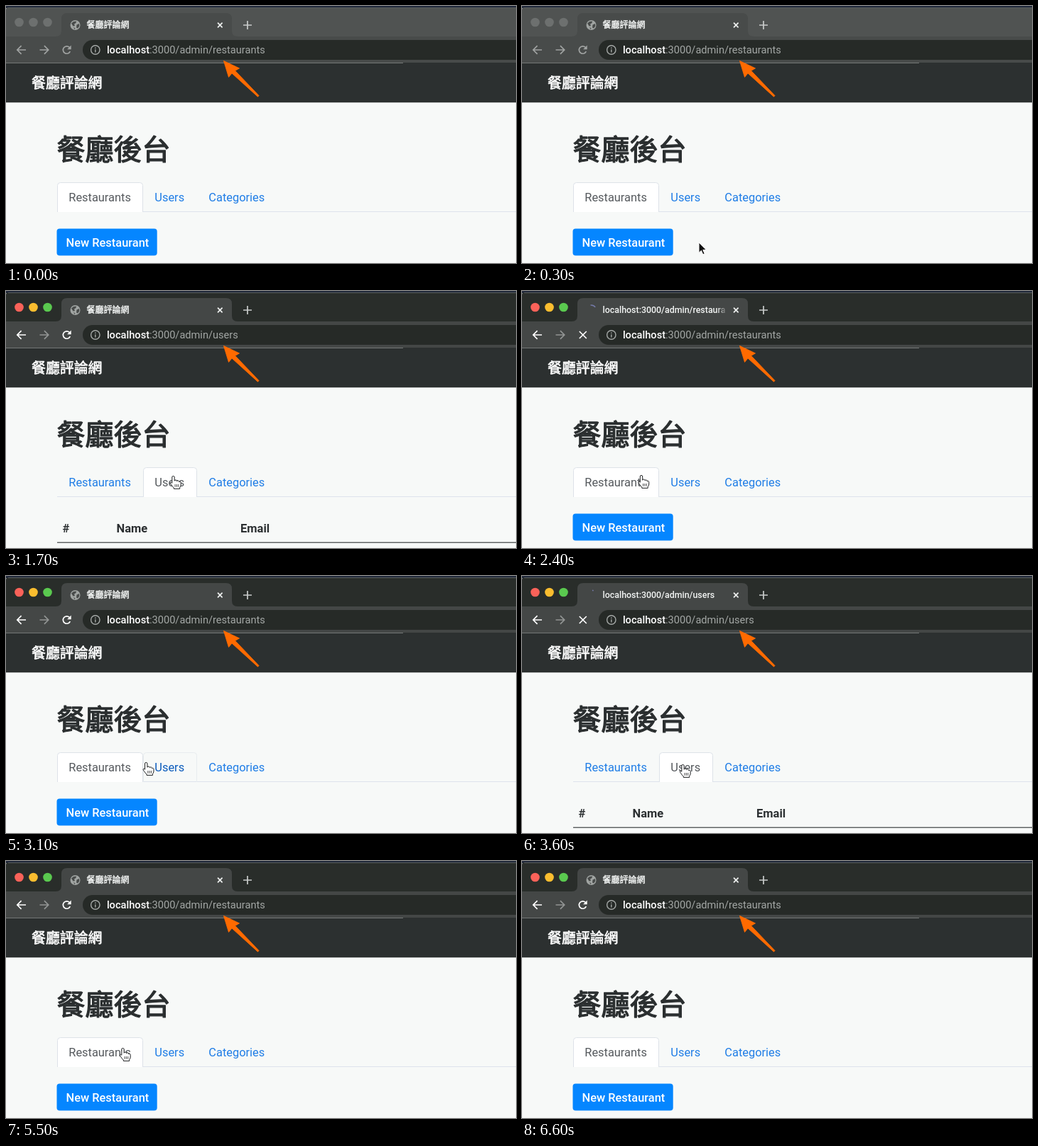
Animation, 718 px wide and 363 px high, one loop 6700 ms. Source, as an HTML page:

```html
<!DOCTYPE html>
<html lang="zh-Hant">
<head>
<meta charset="utf-8">
<title>餐廳評論網</title>
<style>
  html, body { margin: 0; width: 100%; height: 100%; overflow: hidden; background: #f7f9f8; }
  svg { display: block; width: 718px; height: 363px; }
  text { font-family: Roboto, "Noto Sans CJK TC", "Noto Sans CJK", sans-serif; white-space: pre; }
  .cjk { font-family: "Noto Sans CJK TC", "Noto Sans CJK", sans-serif; font-weight: 500; stroke-linejoin: round; }
  .link { font-size: 16.4px; }
  .th { font-size: 16.5px; font-weight: 700; fill: #2b2f31; }
  .icon { fill: none; stroke-width: 1.7; }
</style>
</head>
<body>
<svg viewBox="0 0 718 363">
  <defs>
    <linearGradient id="fade" gradientUnits="userSpaceOnUse" x1="274" x2="290" y1="0" y2="0">
      <stop stop-color="#f2f4f3"/><stop offset="1" stop-color="#f2f4f3" stop-opacity="0"/>
    </linearGradient>
  </defs>

  <!-- browser window -->
  <rect width="718" height="3" fill="#20283a"/>
  <path id="strip" d="M0 5Q0 2 4 2H718V43H0Z"/>
  <rect x="3" y="2" width="715" height="1" fill="#5a5e5d"/>
  <path id="tab" d="M70 43Q78 43 78 35V18Q78 10 86 10H310Q318 10 318 18V35Q318 43 326 43Z"/>
  <rect id="bar" y="43" width="718" height="38"/>
  <rect x="108" y="48" width="640" height="28" rx="14" fill="#262a27"/>
  <g id="lights">
    <circle cx="18.5" cy="23" r="6.3"/><circle cx="38.5" cy="23" r="6.3"/><circle cx="58.5" cy="23" r="6.3"/>
  </g>
  <g id="globe">
    <circle cx="97.5" cy="27" r="7" fill="#a0a4a2"/>
    <path d="M92 24.5L95 22L99 21.5L98.5 24L96 25.5L97 28L94.5 28.5ZM99.5 26.5L103 25L103.3 28.5L101 31.5L99 30.5ZM95 30L97.5 31.5L96.5 33Z" fill="#484b4a"/>
  </g>
  <path id="spin" fill="none" stroke="#747aa8" stroke-width="1.5"/>
  <text id="title" x="113.6" y="31.4" fill="url(#fade)" stroke="url(#fade)" font-weight="500"></text>
  <path d="M298 23.7l6.6 6.6m0-6.6l-6.6 6.6" class="icon" stroke="#eef0ef"/>
  <path d="M334 27h12m-6-6v12" class="icon" stroke="#c9cccb"/>
  <path id="back" class="icon" d="M28 62H16M21.6 56.2L15.8 62L21.6 67.8"/>
  <path id="next" class="icon" d="M47.5 62H59.5M53.9 56.2L59.7 62L53.9 67.8"/>
  <path id="stop" class="icon" d="M80.8 57l10 10m0-10l-10 10" stroke="#fff"/>
  <g id="reload">
    <path class="icon" d="M90.3 64.2A5.2 5.2 0 1 1 89.2 58.3"/>
    <path d="M91.7 55.6V61.2H86.1Z" stroke="none"/>
  </g>
  <g fill="none" stroke="#a5a9a7" stroke-width="1.4">
    <circle cx="125.8" cy="62" r="6.2"/><path d="M125.8 61.2v4.2M125.8 58.4v1.5"/>
  </g>
  <text x="141.9" y="67" font-size="14.6" fill="#a3a7a5"><tspan fill="#fff" font-weight="500">localhost</tspan><tspan id="url"></tspan></text>

  <!-- page -->
  <rect y="80" width="718" height="57" fill="#2c3030"/>
  <rect y="80" width="559" height="1" fill="#747776"/>
  <text class="cjk" x="36" y="115.6" font-size="19.9" fill="#fff" stroke="#fff" stroke-width=".6">餐廳評論網</text>
  <rect y="136.3" width="718" height="227" fill="#f7f9f8"/>
  <text class="cjk" x="71.5" y="217" font-size="40" fill="#2b2f30" stroke="#2b2f30" stroke-width="1.3">餐廳後台</text>
  <rect x="72" y="290" width="646" height="1" fill="#dde2ec"/>
  <g id="tabs"></g>
  <g id="listPage">
    <rect id="button" x="71.5" y="314.6" width="141.2" height="38" rx="4"/>
    <text x="84.6" y="340" font-size="16.4" font-weight="500" fill="#fff">New Restaurant</text>
  </g>
  <g id="userPage">
    <text class="th" x="79.5" y="341">#</text>
    <text class="th" x="155.5" y="341">Name</text>
    <text class="th" x="330" y="341">Email</text>
    <rect x="72" y="354.6" width="646" height="1.3" fill="#4c5051"/>
  </g>
  <path d="M306.5 77.5L328.5 88L322.6 91.4L356 126.6L354.5 128.2L318 95L313.5 100.5Z" fill="#ff6a00" stroke="#ff6a00" stroke-width=".9" stroke-linejoin="round"/>

  <!-- pointers, hot spot at 0,0 -->
  <g id="hand" fill="#fff" stroke="#1d1f20" stroke-linejoin="round">
    <path d="M-1.7 1Q-1.7-.6 0-.6Q1.6-.6 1.7 1V6.2Q2.2 4.6 3.7 5Q4.9 5.3 5 6.6Q5.8 5.5 7 6Q8 6.4 8.1 7.6Q9 6.9 10 7.5Q10.7 8 10.7 9.2V12Q10.5 14.2 9.2 15.4V17.4H.8V16Q-1.5 14-3 11.4Q-4.8 9.4-3.9 8.5Q-2.9 7.7-1.7 9.2Z"/>
    <path d="M2.6 11v3.8M4.9 11v3.8M7.2 11v3.8" stroke-width=".8"/>
  </g>
  <path id="arrow" d="M0 0V14.5L3.4 11.4L5.8 17L8.2 16L5.8 10.6H10.4Z" fill="#111" stroke="#fff" stroke-width="1"/>
</svg>
<script>
const LOOP = 6700, STEP = 100;
const ACTIVE_AT = 400;

// page loads: request sent, page shown, finished
const LOADS = [
  { ask: 1100, show: 1200, done: 1500, page: 'users' },
  { ask: 2200, show: 2300, done: 2600, page: 'restaurants' },
  { ask: 3500, show: 3600, done: 3900, page: 'users' },
  { ask: 5100, show: 5200, done: 5500, page: 'restaurants' }
];

// pointer hot spot: time, x, y
const PATH = [
  [300, 249, 334], [800, 235.5, 262], [1700, 235.5, 262], [2000, 168, 261],
  [2900, 168, 261], [3300, 226.5, 267], [4000, 226.5, 267], [4300, 165.5, 265],
  [5000, 165.5, 265], [5300, 164.5, 265], [5900, 164.5, 265], [6400, 172, 364]
];

const TABS = [
  { name: 'Restaurants', x: 72, w: 121, page: 'restaurants' },
  { name: 'Users', x: 193, w: 76, page: 'users' },
  { name: 'Categories', x: 269, w: 112, page: 'categories' }
];
const TAB_TOP = 249, TAB_END = 291;
const SPIN = [[-78, 14], [-98, 62], [-20, 120]];

const $ = id => document.getElementById(id);
const set = (el, attrs) => { for (const k in attrs) el.setAttribute(k, attrs[k]); };
const show = (id, on) => { $(id).style.display = on ? '' : 'none'; };

function make(tag, parent, attrs) {
  const el = document.createElementNS('http://www.w3.org/2000/svg', tag);
  set(el, attrs);
  return parent.appendChild(el);
}

for (const tab of TABS) {
  const l = tab.x + .5, r = tab.x + tab.w - .5, y = TAB_TOP + .5;
  tab.box = make('path', $('tabs'), {
    d: `M${l} ${TAB_END}V${y + 4}Q${l} ${y} ${l + 4} ${y}H${r - 4}Q${r} ${y} ${r} ${y + 4}V${TAB_END}`
  });
  tab.label = make('text', $('tabs'), { x: tab.x + 16.3, y: 276, class: 'link' });
  tab.label.textContent = tab.name;
}

function pointerAt(t) {
  const i = PATH.findIndex(p => p[0] > t);
  if (i < 1) return null;
  const [t0, x0, y0] = PATH[i - 1], [t1, x1, y1] = PATH[i];
  const k = (t - t0) / (t1 - t0), e = k * k * (3 - 2 * k);
  return { x: x0 + (x1 - x0) * e, y: y0 + (y1 - y0) * e };
}

const inside = (p, x, y, w, h) => !!p && p.x >= x && p.x < x + w && p.y >= y && p.y < y + h;

function arc([from, sweep]) {
  const pt = a => {
    const r = a * Math.PI / 180;
    return `${97.5 + 7 * Math.cos(r)} ${27 + 7 * Math.sin(r)}`;
  };
  return `M${pt(from)}A7 7 0 0 1 ${pt(from + sweep)}`;
}

function drawWindow(active) {
  set($('strip'), { fill: active ? '#292d2a' : '#505352' });
  set($('tab'), { fill: active ? '#444746' : '#484b4a' });
  set($('bar'), { fill: active ? '#444746' : '#484b4a' });
  const colors = active ? ['#fa6259', '#fabd2f', '#5ac94f'] : Array(3).fill('#6d706f');
  [...$('lights').children].forEach((c, i) => set(c, { fill: colors[i] }));
  const main = active ? '#fff' : '#a0a3a2';
  set($('back'), { stroke: main });
  set($('next'), { stroke: active ? '#929594' : main });
  set($('reload'), { stroke: main, fill: main });
}

function drawLoad(t) {
  const load = LOADS.find(l => t >= l.ask && t < l.done);
  const shown = LOADS.filter(l => t >= l.show).pop();
  const page = shown ? shown.page : 'restaurants';
  const path = ':3000/admin/' + page;
  const fetching = !!load && t >= load.show;
  show('stop', load);
  show('reload', !load);
  show('globe', !load);
  show('spin', fetching);
  if (fetching) set($('spin'), { d: arc(SPIN[Math.floor((t - load.show) / STEP)]) });
  $('title').textContent = fetching
    ? ('localhost' + path).slice(0, 29) : '餐廳評論網';
  set($('title'), { 'font-size': fetching ? 12.4 : 12, 'stroke-width': fetching ? 0 : .4 });
  $('url').textContent = path;
  show('listPage', page === 'restaurants');
  show('userPage', page === 'users');
  return page;
}

function drawPointer(p, page) {
  let over = false;
  for (const tab of TABS) {
    const hover = inside(p, tab.x, TAB_TOP, tab.w, TAB_END - TAB_TOP);
    const on = tab.page === page;
    over = over || hover;
    set(tab.box, {
      fill: on ? '#fff' : 'none',
      stroke: on ? '#dde2e8' : hover ? '#e8ecef' : 'none'
    });
    set(tab.label, { fill: on ? '#55595d' : hover ? '#0c5cbc' : '#1f7de6' });
  }
  const press = page === 'restaurants' && inside(p, 72, 315, 140.5, 38);
  set($('button'), { fill: press ? '#0069d9' : '#0586ff' });
  over = over || press;
  show('hand', p && over);
  show('arrow', p && !over);
  if (p) set($(over ? 'hand' : 'arrow'), { transform: `translate(${p.x} ${p.y})` });
}

function draw(now) {
  const t = Math.floor(now % LOOP / STEP) * STEP;
  drawWindow(t >= ACTIVE_AT);
  drawPointer(pointerAt(t), drawLoad(t));
}

const start = performance.now();
function tick() {
  draw(performance.now() - start);
  requestAnimationFrame(tick);
}
tick();
</script>
</body>
</html>
```
